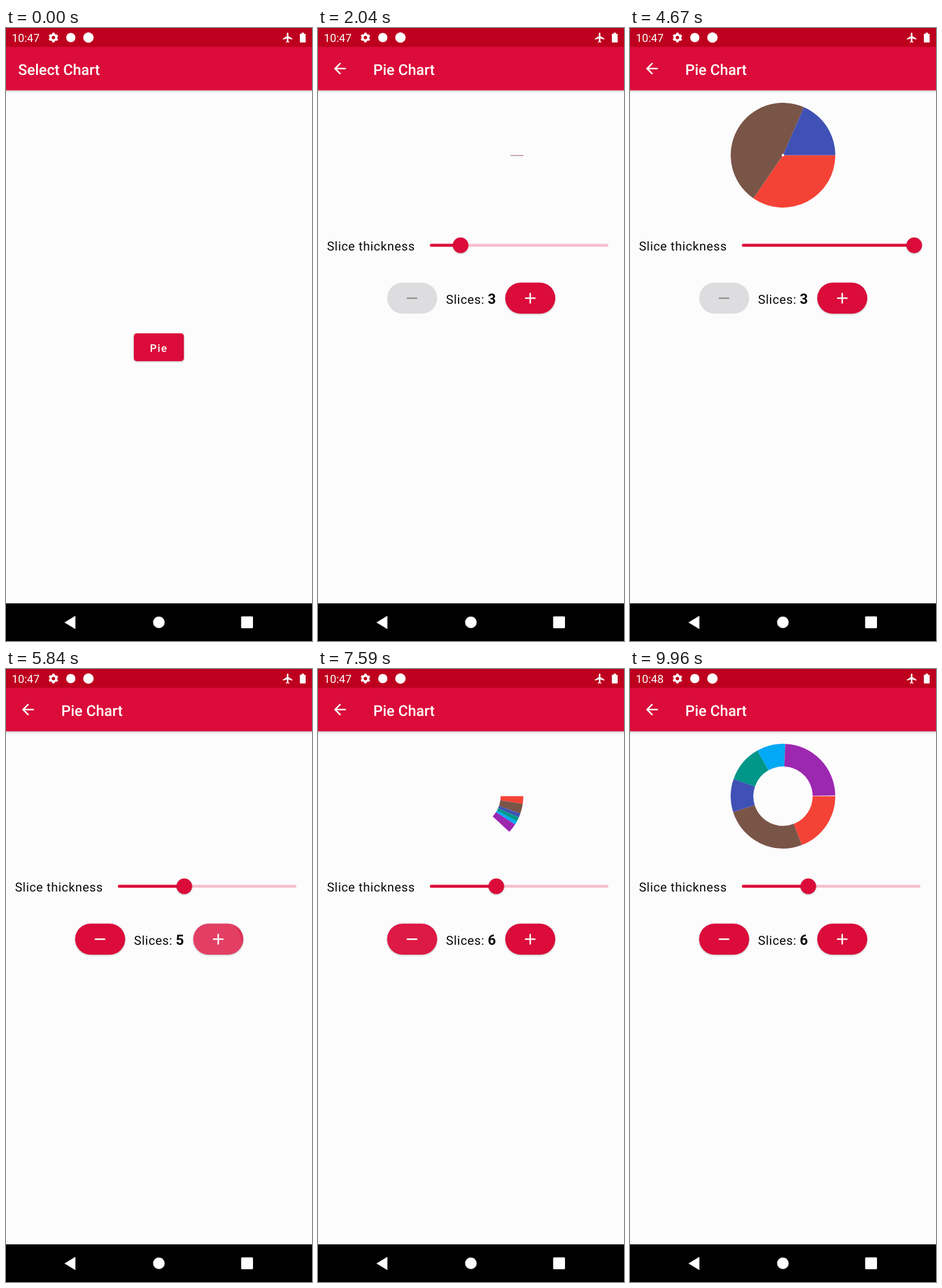
These frames come from a looping animation (529x1058 px, 10000 ms). An HTML page:

```html
<!DOCTYPE html>
<html lang="en">
<head>
<meta charset="utf-8">
<title>Pie chart demo</title>
<style>
  html, body { margin: 0; width: 100%; height: 100%; overflow: hidden; background: #fcfcfd; }
  svg { display: block; width: 529px; height: 1058px; }
  text { font-family: Roboto, sans-serif; text-rendering: geometricPrecision; white-space: pre; }
  .title { font-size: 25.7px; font-weight: 500; fill: #fff; }
  .body { font-size: 21.4px; letter-spacing: .67px; fill: #0a0a0a; }
  .raised { filter: drop-shadow(0 1.5px 1.5px rgba(0, 0, 0, .28)); }
</style>
</head>
<body>
<svg viewBox="0 0 529 1058">
  <defs>
    <linearGradient id="barShadow" x2="0" y2="1">
      <stop stop-color="#000" stop-opacity=".2"/>
      <stop offset="1" stop-color="#000" stop-opacity="0"/>
    </linearGradient>
    <clipPath id="pieClip"><rect x="221" y="527" width="87" height="48" rx="5"/></clipPath>
    <clipPath id="minusClip"><rect x="119.5" y="439.5" width="86.5" height="53.5" rx="26.75"/></clipPath>
    <clipPath id="plusClip"><rect x="323.7" y="439.5" width="86.5" height="53.5" rx="26.75"/></clipPath>
  </defs>

  <rect width="529" height="1058" fill="#fcfcfd"/>
  <rect y="107" width="529" height="5" fill="url(#barShadow)"/>
  <rect y="32" width="529" height="75.5" fill="#db0b3a"/>
  <rect width="529" height="32.5" fill="#be001f"/>

  <!-- status bar -->
  <g fill="#fff">
    <text id="clock" x="10" y="23.5" font-size="19.3">10:47</text>
    <g transform="translate(82 16.5)" fill="none" stroke="#fff">
      <circle r="4.9" stroke-width="3.8"/>
      <circle r="7.1" stroke-width="2.6" stroke-dasharray="3.9 3.535" stroke-dashoffset="1.95" transform="rotate(30)"/>
    </g>
    <circle cx="112" cy="16.5" r="8"/>
    <circle cx="142.5" cy="16.5" r="9"/>
    <path transform="translate(477 6.3) scale(.86)" d="M21 16v-2l-8-5V3.5c0-.83-.67-1.5-1.5-1.5S10 2.67 10 3.5V9l-8 5v2l8-2.5V19l-2 1.5V22l3.5-1 3.5 1v-1.5L13 19v-5.5z"/>
    <path d="M511 8h4v2h2a1 1 0 0 1 1 1v13a1 1 0 0 1-1 1h-8a1 1 0 0 1-1-1v-13a1 1 0 0 1 1-1h2z"/>
  </g>

  <g id="selectScreen">
    <text class="title" x="21" y="80.5">Select Chart</text>
    <rect class="raised" x="221" y="527" width="86.5" height="48" rx="5" fill="#db0b3a"/>
    <g id="pieRipple" clip-path="url(#pieClip)" fill="#fff"></g>
    <text x="248.7" y="558.5" font-size="18.2" font-weight="500" letter-spacing="1.6" fill="#fff">Pie</text>
  </g>

  <g id="chartScreen">
    <path transform="translate(22.5 54.6) scale(1.287)" fill="#fff" d="M20 11H7.83l5.59-5.59L12 4l-8 8 8 8 1.41-1.41L7.83 13H20z"/>
    <text class="title" x="95.5" y="80.5">Pie Chart</text>
    <g id="ring"></g>
    <text class="body" x="15.4" y="384">Slice thickness</text>
    <g stroke-width="5.2" stroke-linecap="round">
      <path d="M196 375H499.5" stroke="#f5c0cc"/>
      <path id="track" stroke="#db0b3a"/>
    </g>
    <circle id="thumb" class="raised" cy="375" r="13.5" fill="#db0b3a"/>

    <rect id="minusBox" x="119.5" y="439.5" width="86.5" height="53.5" rx="26.75"/>
    <g id="minusRipple" clip-path="url(#minusClip)" fill="#fff"></g>
    <path id="minusIcon" d="M153.4 466.3h18.2" stroke-width="2.6"/>
    <text class="body" x="221.3" y="475.5">Slices: </text>
    <text id="count" x="293.4" y="475.7" font-size="24.5" font-weight="700" fill="#0a0a0a"></text>
    <rect class="raised" x="323.7" y="439.5" width="86.5" height="53.5" rx="26.75" fill="#db0b3a"/>
    <g id="plusRipple" clip-path="url(#plusClip)" fill="#fff"></g>
    <path d="M357.8 466.3h18.2M366.9 457.2v18.2" stroke="#fff" stroke-width="2.6"/>
  </g>

  <!-- navigation bar -->
  <rect y="993" width="529" height="65" fill="#000"/>
  <g fill="#fff">
    <path d="M101 1026l19-11.5v23z"/>
    <circle cx="264.3" cy="1025.7" r="10"/>
    <rect x="406.5" y="1015.5" width="20.5" height="20.5" rx="1.8"/>
  </g>
</svg>
<script>
const LOOP = 10000, SWEEP = 1000, OPEN = 1950, MINUTE = 9400;
const CENTER = { x: 264.5, y: 219.5 }, RADIUS = 90.4;

const slices = [
  { color: '#f44336', weight: 69 },
  { color: '#795548', weight: 93.7 },
  { color: '#3f51b5', weight: 36.8 },
  { color: '#009688', weight: 41.5 },
  { color: '#03a9f4', weight: 32 },
  { color: '#9c27b0', weight: 86.7 },
  { color: '#ff5722', weight: 53.9 }
];

// Each entry restarts the sweep with a new number of slices.
const sweeps = [
  { at: 2010, count: 3 }, { at: 5480, count: 4 }, { at: 5840, count: 5 },
  { at: 6194, count: 6 }, { at: 6680, count: 7 }, { at: 7400, count: 6 },
  { at: 8092, count: 7 }, { at: 9027, count: 6 }
];

// Thumb position over time: [ms, x]
const drag = [[3250, 246.5], [4350, 491.3], [4760, 491.3], [5250, 308.2]];

const byId = id => document.getElementById(id);
const clamp = v => Math.min(1, Math.max(0, v));

function make(tag, parent, attrs) {
  const node = document.createElementNS('http://www.w3.org/2000/svg', tag);
  set(node, attrs);
  return parent.appendChild(node);
}
function set(node, attrs) {
  for (const name in attrs) node.setAttribute(name, attrs[name]);
}

// cubic-bezier(.4, 0, .2, 1)
function ease(x) {
  if (x <= 0 || x >= 1) return clamp(x);
  let lo = 0, hi = 1;
  for (let i = 0; i < 24; i++) {
    const s = (lo + hi) / 2, r = 1 - s;
    if (1.2 * s * r * r + .6 * s * s * r + s * s * s < x) lo = s; else hi = s;
  }
  return lo * lo * (3 - 2 * lo);
}

function thumbAt(t) {
  let x = drag[0][1];
  for (let i = 1; i < drag.length; i++) {
    const [t0, x0] = drag[i - 1], [t1, x1] = drag[i];
    if (t >= t0) {
      const p = clamp((t - t0) / (t1 - t0));
      x = x0 + (x1 - x0) * p * p * (3 - 2 * p);
    }
  }
  return x;
}

function sectorPath(from, to, inner) {
  const point = (r, a) => {
    const rad = a * Math.PI / 180;
    return `${(CENTER.x + r * Math.cos(rad)).toFixed(2)} ${(CENTER.y + r * Math.sin(rad)).toFixed(2)}`;
  };
  const large = to - from > 180 ? 1 : 0;
  return `M${point(RADIUS, from)}A${RADIUS} ${RADIUS} 0 ${large} 1 ${point(RADIUS, to)}` +
    `L${point(inner, to)}A${inner} ${inner} 0 ${large} 0 ${point(inner, from)}Z`;
}

const sectors = slices.map(s => make('path', byId('ring'), { fill: s.color }));

function makeRipple(id, x, y, taps) {
  const group = byId(id);
  const wash = make('rect', group, { width: 529, height: 700 });
  const spot = make('circle', group, { cx: x, cy: y });
  return t => {
    const tap = taps.find(at => t >= at - 180 && t < at + 250);
    group.style.display = tap ? '' : 'none';
    if (!tap) return;
    const age = t - tap + 180;
    const alpha = clamp(age / 75) * (1 - clamp((t - tap) / 250));
    set(wash, { 'fill-opacity': .15 * alpha });
    set(spot, { r: 15 + age * .155, 'fill-opacity': .08 * alpha });
  };
}

const tapsWhere = test => sweeps.filter((s, i) => i && test(s.count - sweeps[i - 1].count)).map(s => s.at);
const ripples = [
  makeRipple('pieRipple', 264, 551, [1850]),
  makeRipple('plusRipple', 364, 473, tapsWhere(d => d > 0)),
  makeRipple('minusRipple', 162, 470, tapsWhere(d => d < 0))
];

function drawRing(count, progress, thickness) {
  const total = slices.slice(0, count).reduce((sum, s) => sum + s.weight, 0);
  let angle = 0;
  sectors.forEach((node, i) => {
    const visible = i < count && progress > 0;
    node.style.display = visible ? '' : 'none';
    if (!visible) return;
    const end = angle + slices[i].weight / total * 360 * progress;
    set(node, { d: sectorPath(angle, end, RADIUS - thickness) });
    angle = end;
  });
}

function draw(t) {
  const open = t >= OPEN;
  byId('selectScreen').style.display = open ? 'none' : '';
  byId('chartScreen').style.display = open ? '' : 'none';
  byId('clock').textContent = t < MINUTE ? '10:47' : '10:48';
  ripples.forEach(ripple => ripple(t));
  if (!open) return;

  const sweep = sweeps.filter(s => t >= s.at).pop() || sweeps[0];
  const x = thumbAt(t);
  drawRing(sweep.count, ease((t - sweep.at) / SWEEP), 22.6 + (x - 246.5) * .268);
  byId('count').textContent = sweep.count;
  set(byId('track'), { d: `M196 375H${x.toFixed(2)}` });
  set(byId('thumb'), { cx: x.toFixed(2) });

  const enabled = sweep.count > 3;
  set(byId('minusBox'), { fill: enabled ? '#db0b3a' : '#dddddf', class: enabled ? 'raised' : '' });
  set(byId('minusIcon'), { stroke: enabled ? '#fff' : '#959595' });
}

function tick() {
  draw(performance.now() % LOOP);
  requestAnimationFrame(tick);
}
tick();
</script>
</body>
</html>
```
